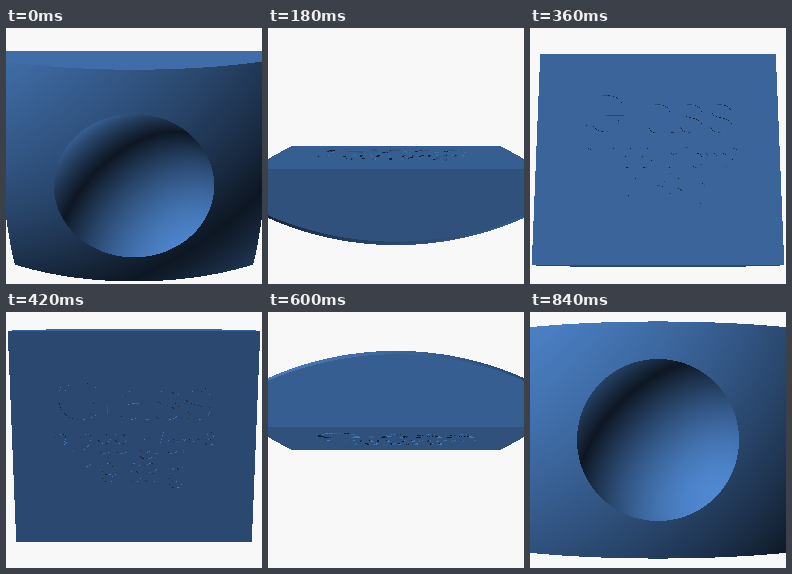
Animation, 256 px wide and 256 px high, one loop 900 ms. Source, as an HTML page with a canvas:

```html
<!DOCTYPE html>
<html>
<head>
<meta charset="utf-8">
<style>
  html, body { margin: 0; width: 100%; height: 100%; overflow: hidden; background: #f8f8f8; }
  canvas { display: block; width: 256px; height: 256px; }
</style>
</head>
<body>
<canvas id="stage" width="256" height="256"></canvas>
<script>
const SIZE = 256, MID = SIZE / 2, STEPS = 15, STEP_MS = 60;
const CAMERA = MID / Math.tan(Math.PI / 16);         // eye distance and focal length, 22.5° view
const HALF_W = 121.8, HALF_H = 107.2, BACK = -0.5;   // block, rotating about the x axis
const DOME = { z: -204.5, r: 286.8 };                // convex front
const BOWL = { z: 118.7, r: 85 };                    // hollow in the front
const ENGRAVE = 1.7, TEX = 4;                        // text depth, texels per unit
const COLOR = [66, 113, 174], PAPER = [248, 248, 248];

const ctx = document.getElementById('stage').getContext('2d');
const image = ctx.createImageData(SIZE, SIZE);

function makeLabel() {
  const side = SIZE * TEX;
  const canvas = document.createElement('canvas');
  canvas.width = canvas.height = side;
  const g = canvas.getContext('2d');
  g.scale(TEX, TEX);
  g.textAlign = 'center';
  const line = (text, size, baseline) => {
    g.font = size + 'px "Liberation Sans", Arial, sans-serif';
    g.fillText(text, MID, MID - baseline);
  };
  line('Glass', 60.5, 21);
  line('2.288 g/cm³', 30.5, -13.4);
  line('19.63 g', 30.5, -43.4);
  const data = g.getImageData(0, 0, side, side).data;
  return (x, y) => {
    const u = Math.floor((x + MID) * TEX), v = Math.floor((y + MID) * TEX);
    return u < 0 || v < 0 || u >= side || v >= side ? 0 : data[(v * side + u) * 4 + 3];
  };
}
const label = makeLabel();

// Both ray parameters where o + t*d meets a sphere centred on the z axis
function hitSphere(o, d, s) {
  const oz = o[2] - s.z;
  const a = d[0] * d[0] + d[1] * d[1] + d[2] * d[2];
  const b = o[0] * d[0] + o[1] * d[1] + oz * d[2];
  const c = o[0] * o[0] + o[1] * o[1] + oz * oz - s.r * s.r;
  const q = b * b - a * c;
  return q < 0 ? null : [(-b - Math.sqrt(q)) / a, (-b + Math.sqrt(q)) / a];
}

// Normal of the engraved wall seen through the back face, if any
function wallNormal(p, d) {
  const steps = 24, e = 0.7;
  for (let i = 0; i <= steps; i++) {
    const k = ENGRAVE * i / steps / d[2];
    const x = p[0] + d[0] * k, y = p[1] + d[1] * k;
    if (label(x, y) > 127) continue;
    if (!i) return null;
    const gx = label(x + e, y) - label(x - e, y);
    const gy = label(x, y + e) - label(x, y - e);
    const len = Math.hypot(gx, gy);
    return len ? [gx / len, gy / len, 0] : null;
  }
  return null;
}

// Surface normal where the ray first meets the block, or null
function trace(o, d) {
  const dome = hitSphere(o, d, DOME);
  if (!dome) return null;
  let [near, far] = dome, face = null;
  const clip = (axis, sign, limit) => {
    const speed = d[axis] * sign, t = (limit - o[axis] * sign) / speed;
    if (speed > 0) far = Math.min(far, t);
    else if (t > near) {
      near = t;
      face = [0, 0, 0];
      face[axis] = sign;
    }
  };
  clip(0, 1, HALF_W);
  clip(0, -1, HALF_W);
  clip(1, 1, HALF_H);
  clip(1, -1, HALF_H);
  clip(2, -1, -BACK);
  if (near > far) return null;

  const at = t => o.map((v, i) => v + d[i] * t);
  const p = at(near);
  if (face) return face[2] && wallNormal(p, d) || face;
  if (Math.hypot(p[0], p[1], p[2] - BOWL.z) < BOWL.r) {
    const q = at(hitSphere(o, d, BOWL)[1]);
    return [-q[0] / BOWL.r, -q[1] / BOWL.r, (BOWL.z - q[2]) / BOWL.r];
  }
  return [p[0] / DOME.r, p[1] / DOME.r, (p[2] - DOME.z) / DOME.r];
}

function render(angle) {
  const c = Math.cos(angle), s = Math.sin(angle);
  const toObject = (x, y, z) => [x, y * c + z * s, z * c - y * s];
  const eye = toObject(0, 0, CAMERA);
  const light = toObject(-1, 1, 1).map(v => v / Math.sqrt(3));
  for (let y = 0, i = 0; y < SIZE; y++) {
    for (let x = 0; x < SIZE; x++, i += 4) {
      const n = trace(eye, toObject(x + 0.5 - MID, MID - y - 0.5, -CAMERA));
      const shade = n && 0.2 + Math.abs(n[0] * light[0] + n[1] * light[1] + n[2] * light[2]);
      for (let k = 0; k < 3; k++) image.data[i + k] = n ? COLOR[k] * shade : PAPER[k];
      image.data[i + 3] = 255;
    }
  }
  ctx.putImageData(image, 0, 0);
}

let shown = -1;
function tick() {
  const step = Math.floor(performance.now() / STEP_MS) % STEPS;
  if (step !== shown) {
    shown = step;
    render((step + 1) * 2 * Math.PI / STEPS);
  }
  requestAnimationFrame(tick);
}
tick();
</script>
</body>
</html>
```
